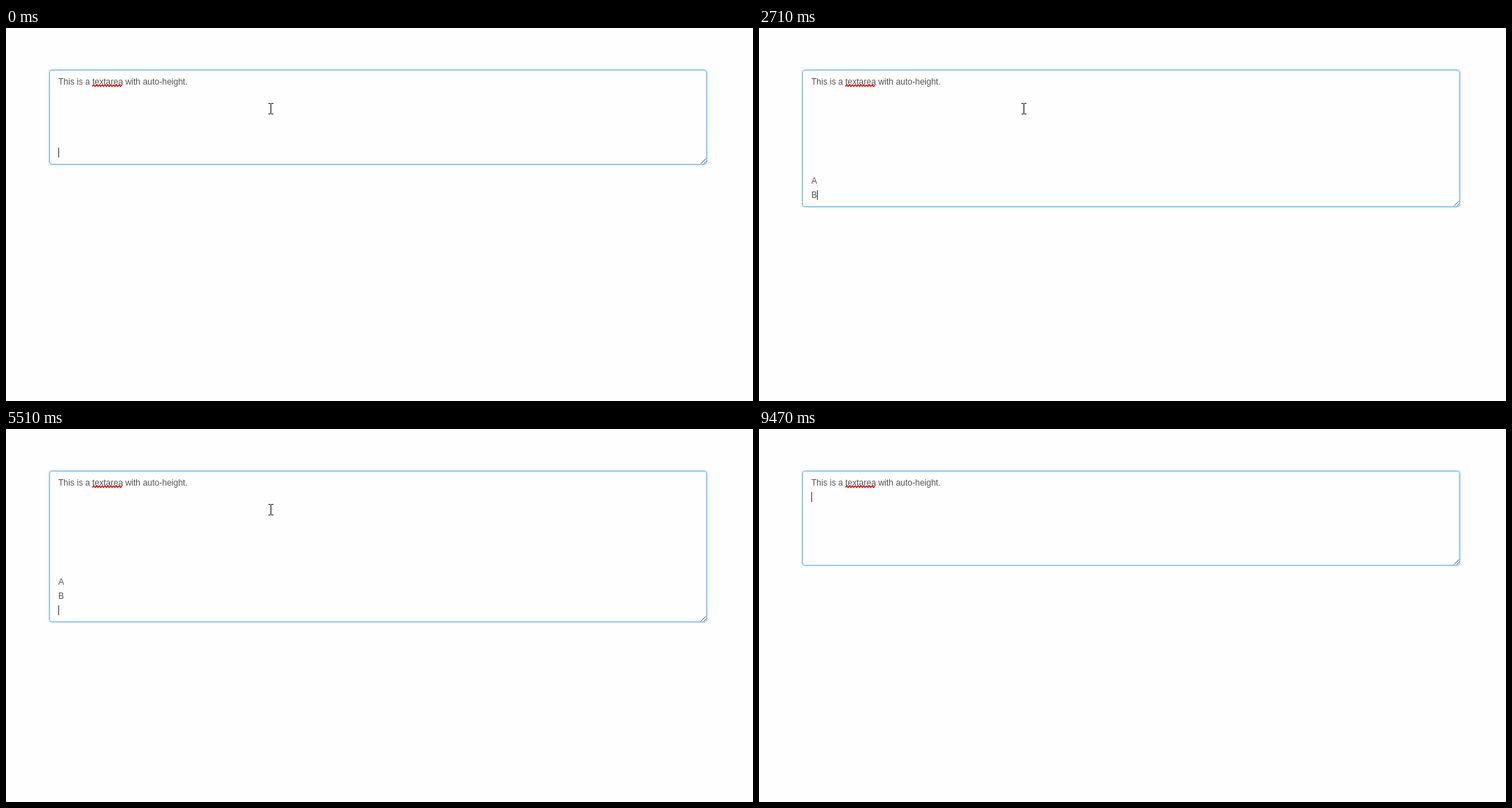
These frames come from a looping animation (1056 px wide and 527 px high, 9570 ms). An HTML page:

```html
<!DOCTYPE html>
<html lang="en">
<head>
<meta charset="utf-8">
<title>Auto-height textarea</title>
<style>
  html, body { margin: 0; width: 100%; height: 100%; overflow: hidden; background: #fefefe; }
  #stage { position: relative; width: 1056px; height: 527px; overflow: hidden; }
  #box {
    position: absolute; left: 61px; top: 59px; width: 930px;
    box-sizing: border-box; padding: 6px 12px;
    border: 1px solid #5db0e8; border-radius: 4px;
    box-shadow: 0 0 3px rgba(81, 167, 232, .5);
    font: 12px/20px "Liberation Sans", Arial, sans-serif; color: #555;
    white-space: pre;
  }
  svg { position: absolute; display: block; overflow: visible; }
  #grip { right: 0; bottom: 0; }
  #caret { position: absolute; width: 1px; height: 14px; background: #333; }
</style>
</head>
<body>
<div id="stage">
  <div id="box"><span id="text"></span><svg id="grip" width="8" height="8" fill="none" stroke="#555"><path d="M0.5 7.5L7.5 0.5M4.5 7.5L7.5 4.5"/></svg></div>
  <svg width="1056" height="527" fill="none">
    <path id="wave" stroke="#d00" stroke-width="1.4"/>
  </svg>
  <div id="caret"></div>
  <svg width="1056" height="527">
    <g id="mouse">
      <path id="beam" shape-rendering="crispEdges" d="M-3-8h3v1h1v-1h3v1h-3v14h3v1h-3v-1h-1v1h-3v-1h3v-14h-3z"/>
      <path id="arrow" fill="#fff" stroke="#000" d="M.5.5v16l3.7-3.5 2.6 5.8 2.3-1-2.5-5.6h5z"/>
    </g>
  </svg>
</div>
<script>
  const LOOP = 9570, LINE = 20, MIN_ROW = 5, BLINK = 513;
  const TITLE = "This is a textarea with auto-height.";
  const KEYS = "\n\nA\nB\nC\nD";
  const KEY_TIMES = [370, 770, 1630, 2000, 2710, 3110, 3520, 3890, 4480];
  const FIRST_LETTER = 1630, CLEARED = 6730, LEAVE = 8320;
  const $ = id => document.getElementById(id);

  // Every key press, with the text below the title after it
  const presses = [{ time: 0, text: "\n".repeat(MIN_ROW) }];
  const press = (time, edit) => presses.push({ time, text: edit(presses.at(-1).text) });
  const erase = (from, step, count) => {
    for (let i = 0; i < count; i++) press(from + i * step, s => s.slice(0, -1));
  };
  KEY_TIMES.forEach((time, i) => press(time, s => s + KEYS[i]));
  erase(4960, 185, 5);
  erase(6030, 175, 4);
  press(CLEARED, () => "\n");

  let wave = "M122 82.5";
  for (let x = 124; x <= 165; x += 2) wave += `L${x} ${x % 4 ? 82.5 : 80.5}`;
  $("wave").setAttribute("d", wave);

  const pen = document.createElement("canvas").getContext("2d");
  pen.font = '12px "Liberation Sans", Arial, sans-serif';

  // Typing restarts the blink; otherwise it runs on by itself
  function caretOn(t, pressed) {
    const since = t < FIRST_LETTER ? -90 : t < CLEARED ? pressed : CLEARED - BLINK;
    return Math.floor((t - since) / BLINK) % 2 === 0;
  }

  function drawText(t) {
    const { time, text } = presses.findLast(p => p.time <= t);
    const lines = text.split("\n"), row = lines.length - 1;
    const full = TITLE + text;
    if ($("text").textContent !== full) $("text").textContent = full;
    $("box").style.height = Math.max(row, MIN_ROW) * LINE + 34 + "px";

    const caret = $("caret").style;
    caret.left = 74 + Math.round(pen.measureText(lines[row]).width) + "px";
    caret.top = 69 + row * LINE + "px";
    caret.visibility = caretOn(t, time) ? "visible" : "hidden";
  }

  // The pointer leaves towards the lower right in even steps
  function drawMouse(t) {
    const step = Math.max(0, Math.floor((t - LEAVE) / 62.5));
    const p = step / 7;
    const x = Math.round(374 + 607 * p), y = Math.round(114 + 396 * p);
    const inside = y < 193;
    $("mouse").setAttribute("transform", `translate(${x} ${y})`);
    $("mouse").style.display = step > 7 ? "none" : "";
    $("beam").style.display = inside ? "" : "none";
    $("arrow").style.display = inside ? "none" : "";
  }

  const start = performance.now();
  function draw() {
    const t = (performance.now() - start) % LOOP;
    drawText(t);
    drawMouse(t);
    requestAnimationFrame(draw);
  }
  draw();
</script>
</body>
</html>
```
